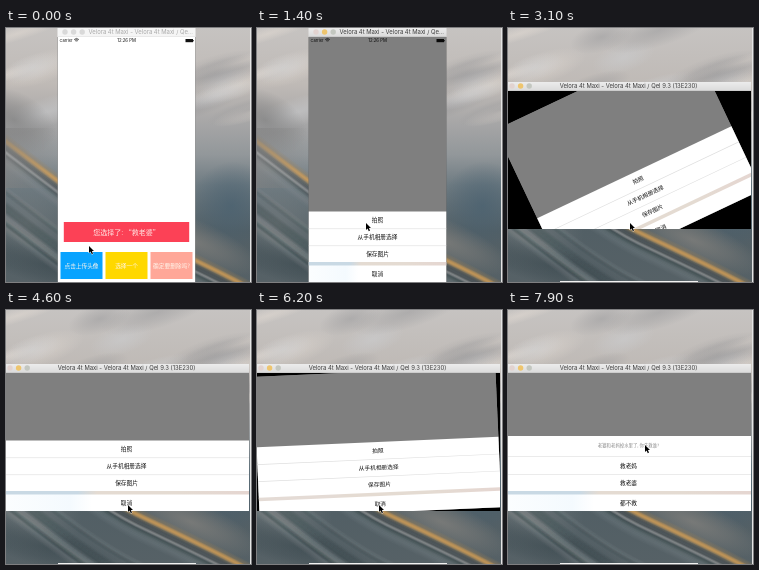
An HTML page with a canvas for the animation above (8 s loop, 245x254 px).

```html
<!DOCTYPE html>
<html lang="zh-CN">
<head>
<meta charset="utf-8">
<title>Action sheet demo</title>
<style>
  html, body { margin: 0; width: 100%; height: 100%; overflow: hidden; background: #777; }
  canvas { display: block; width: 245px; height: 254px; }
</style>
</head>
<body>
<canvas id="stage"></canvas>
<script>
const W = 245, H = 254, LOOP = 8000, STEP = 100;
const CJK = '"Noto Sans CJK SC", "Noto Sans CJK", "Noto Sans", sans-serif';
const LATIN = 'Inter, "Open Sans", sans-serif';
const DEVICE = 'Velora 4t Maxi';

const canvas = document.getElementById('stage');
const ctx = canvas.getContext('2d');
const dpr = Math.max(1, window.devicePixelRatio || 1);
canvas.width = W * dpr;
canvas.height = H * dpr;

// Content area of the window in each orientation
const PORTRAIT = { x: 51.5, y: 9, w: 138, h: 245 };
const LANDSCAPE = { x: -2, y: 63, w: 245, h: 138 };

// [start, landscape]
const TURNS = [[0, false], [2840, true], [4640, false], [5840, true]];
const TURN_TIME = 400;

// [time, x, y] of the pointer tip
const POINTER = [
  [0, 83, 218], [400, 77, 232], [1200, 77, 232], [1400, 109, 195],
  [1600, 111, 196], [1800, 114, 196], [1900, 114, 196], [2300, 122, 195],
  [6250, 122, 195], [6450, 130, 116], [6900, 130, 116], [7200, 122, 184],
  [7600, 122, 184], [7900, 137, 135], [8000, 137, 135]
];

const SHEETS = [
  { open: [850, 1250], close: [6400, 6650], height: 70.5,
    rows: [['拍照', 62], ['从手机相册选择', 45], ['保存图片', 28], ['取消', 8.5]],
    lines: [53.5, 36.5] },
  { open: [7300, 7650], close: [9000, 9100], height: 75,
    caption: ['老婆和老妈掉水里了, 你先救谁?', 65.5],
    rows: [['救老妈', 45.5], ['救老婆', 28], ['都不救', 8.5]],
    lines: [55, 37] }
];

const clamp = v => Math.min(1, Math.max(0, v));
const lerp = (a, b, p) => a + (b - a) * p;
const span = (t, [a, b]) => clamp((t - a) / (b - a));
const smooth = p => p * p * (3 - 2 * p);
const easeOut = p => 1 - (1 - p) ** 3;

function box(x, y, w, h, fill) {
  ctx.fillStyle = fill;
  ctx.fillRect(x, y, w, h);
}

function text(str, x, y, size, fill, family = CJK, align = 'center') {
  ctx.font = `${size}px ${family}`;
  ctx.textAlign = align;
  ctx.textBaseline = 'middle';
  ctx.fillStyle = fill;
  ctx.fillText(str, x, y);
}

function blend(x0, y0, x1, y1, stops) {
  const g = ctx.createLinearGradient(x0, y0, x1, y1);
  stops.forEach(([at, color]) => g.addColorStop(at, color));
  return g;
}

function dot(x, y, r, fill) {
  ctx.fillStyle = fill;
  ctx.beginPath();
  ctx.arc(x, y, r, 0, Math.PI * 2);
  ctx.fill();
}

// Soft elliptical patch of light or shade
function cloud(x, y, rx, ry, tilt, rgb, alpha) {
  ctx.save();
  ctx.translate(x, y);
  ctx.rotate(tilt);
  ctx.scale(rx, ry);
  const g = ctx.createRadialGradient(0, 0, 0, 0, 0, 1);
  g.addColorStop(0, `rgba(${rgb},${alpha})`);
  g.addColorStop(.5, `rgba(${rgb},${alpha * .55})`);
  g.addColorStop(1, `rgba(${rgb},0)`);
  dot(0, 0, 1, g);
  ctx.restore();
}

function streak(shift, width, color) {
  ctx.beginPath();
  ctx.moveTo(-10, 106 + shift);
  ctx.bezierCurveTo(45, 148 + shift, 90, 184 + shift, 130, 204 + shift);
  ctx.bezierCurveTo(165, 221 + shift, 205, 239 + shift, 255, 266 + shift);
  ctx.lineWidth = width;
  ctx.strokeStyle = color;
  ctx.stroke();
}

function softStreak(shift, width, rgb, alpha) {
  for (let i = 1; i <= 5; i++) streak(shift, width * i / 5, `rgba(${rgb},${alpha / 5})`);
}

function drawWallpaper() {
  box(0, 0, W, H, blend(0, 0, 0, H, [
    [0, '#c6c3c1'], [.22, '#bfbab6'], [.36, '#a9a8a8'], [.5, '#92979a'],
    [.62, '#6d7a81'], [.8, '#525f65'], [1, '#566166']
  ]));
  let seed = 11;
  const random = () => (seed = seed * 16807 % 2147483647) / 2147483647;
  for (let i = 0; i < 24; i++) {
    const tone = ['228,220,212', '150,150,152', '205,207,210'][i % 3];
    cloud(random() * W, random() * 105, 25 + random() * 35, 6 + random() * 12, -.3, tone, .5);
  }
  cloud(8, 92, 45, 28, .5, '125,125,125', .7);
  cloud(20, 195, 60, 45, .6, '120,126,128', .6);
  cloud(225, 178, 40, 45, .2, '72,96,112', .7);
  cloud(185, 212, 75, 22, .4, '132,130,126', .75);
  cloud(40, 238, 90, 20, .3, '58,72,78', .6);
  for (let i = 0; i < 14; i++) {
    const light = i % 2;
    softStreak(5 + random() * 85, 4 + random() * 10, light ? '175,182,184' : '40,52,58', light ? .16 : .22);
  }
  softStreak(9, 13, '48,50,50', .45);
  softStreak(-1, 11, '165,128,82', .6);
  softStreak(0, 5.5, '224,168,82', .9);
  box(0, 100, 52, 60, blend(0, 0, 52, 0, [[0, 'rgba(130,130,130,.55)'], [1, 'rgba(130,130,130,0)']]));
  softStreak(11, 4, '205,207,206', .5);
  box(244, 0, 1, H, '#e4e4e4');
}

function drawTitleBar(area, landscape, active) {
  const top = area.y - 9, x = landscape ? 0 : area.x;
  const width = area.x + area.w - x;
  box(x, top, width, 9, active
    ? blend(0, top, 0, top + 9, [[0, '#ececec'], [1, '#dadada']]) : '#f5f5f5');
  box(x, top + 8.5, width, .5, active ? '#bcbcbc' : '#dddddd');
  const lights = active ? ['#e2d3d0', '#eec56e', '#c3c7c0'] : ['#d9d9d9', '#d9d9d9', '#d9d9d9'];
  const first = landscape ? 4 : 59;
  lights.forEach((color, i) => dot(first + i * 8.6, top + 4, 2.7, color));
  const ink = active ? '#3d3d3d' : '#a9a9a9';
  if (landscape) {
    text(`${DEVICE} - ${DEVICE} / Qel 9.3 (13E230)`, 120.5, top + 4.2, 5.9, ink, LATIN);
  } else {
    text(`${DEVICE} - ${DEVICE} / Qe...`, 82.5, top + 4.2, 5.9, ink, LATIN, 'left');
  }
}

function drawStatusBar(w) {
  text('Carrier', 2, 3.6, 4, '#111', LATIN, 'left');
  ctx.strokeStyle = '#111';
  ctx.lineWidth = .7;
  for (const r of [1, 2.2, 3.4]) {
    ctx.beginPath();
    ctx.arc(19, 5, r, -Math.PI * .75, -Math.PI * .25);
    ctx.stroke();
  }
  text('12:26 PM', w / 2, 3.6, 4.3, '#111', LATIN);
  box(w - 10, 2, 7.5, 3.2, '#111');
  box(w - 2.2, 3, .7, 1.3, '#111');
}

function drawHome(w, h) {
  box(0, 0, w, h, '#fff');
  box(6.3, h - 60, w - 12.6, 20, '#fc4156');
  text('您选择了: “救老婆”', w / 2, h - 50, 7, '#ffe9e6');
  const bw = (w - 12) / 3;
  [['#08a3ff', '点击上传头像'], ['#ffd800', '选择一个'], ['#ffa798', '确定要删除吗?']]
    .forEach(([color, label], i) => {
      const x = 3 + i * (bw + 3);
      box(x, h - 30, bw, 27, color);
      text(label, x + bw / 2, h - 16.5, 5.7, '#fff6ec');
    });
}

function drawSheet(sheet, w, h, shown, tinted) {
  box(0, 0, w, h, `rgba(0,0,0,${.5 * shown})`);
  ctx.save();
  ctx.translate(0, (1 - shown) * sheet.height);
  box(0, h - sheet.height, w, sheet.height, '#fff');
  sheet.lines.forEach(y => box(0, h - y, w, .6, '#dedede'));
  const edge = tinted ? '#c9d9e4' : '#e4dbd5';
  box(0, h - 20, w, 3.5, blend(0, 0, w, 0,
    [[0, edge], [.3, edge], [.38, '#e4dbd2'], [.7, '#e4dbd2'], [1, '#e5d6d1']]));
  if (tinted) {
    box(0, h - 16.5, w * .36, 16.5, blend(0, 0, w * .36, 0,
      [[0, 'rgba(70,170,240,.02)'], [.75, 'rgba(70,170,240,.06)'], [1, 'rgba(70,170,240,0)']]));
  }
  if (sheet.caption) text(sheet.caption[0], w / 2, h - sheet.caption[1], 4.4, '#8a8a8a');
  sheet.rows.forEach(([label, y]) => text(label, w / 2, h - y, 5.7, '#111'));
  ctx.restore();
}

function drawWindow(t) {
  const [start, landscape] = TURNS.filter(turn => turn[0] <= t).pop();
  const area = landscape ? LANDSCAPE : PORTRAIT;
  const before = landscape ? PORTRAIT : LANDSCAPE;
  const p = start ? smooth(clamp((t - start) / TURN_TIME)) : 1;
  const w = lerp(before.w, area.w, p), h = lerp(before.h, area.h, p);

  if (landscape) box(52, 253, 138, 1, '#f2f2f2');
  drawTitleBar(area, landscape, t >= 800);
  ctx.save();
  ctx.beginPath();
  ctx.rect(area.x, area.y, area.w, area.h);
  ctx.clip();
  box(area.x, area.y, area.w, area.h, '#000');
  ctx.translate(area.x + area.w / 2, area.y + area.h / 2);
  ctx.rotate((landscape ? -1 : 1) * (1 - p) * Math.PI / 2);
  ctx.translate(-w / 2, -h / 2);
  drawHome(w, h);
  if (!landscape) drawStatusBar(w);
  for (const sheet of SHEETS) {
    const shown = easeOut(span(t, sheet.open)) * (1 - smooth(span(t, sheet.close)));
    if (shown > 0) drawSheet(sheet, w, h, shown, t < 4650 || t > 7000);
  }
  ctx.restore();
}

function drawPointer(t) {
  const i = Math.max(1, POINTER.findIndex(k => k[0] > t));
  const [t0, x0, y0] = POINTER[i - 1], [t1, x1, y1] = POINTER[i];
  const p = smooth(span(t, [t0, t1]));
  ctx.save();
  ctx.translate(lerp(x0, x1, p), lerp(y0, y1, p));
  const arrow = new Path2D('M0 0V7L1.6 5.6L2.8 8.2L4 7.6L2.9 5.1H5Z');
  ctx.lineWidth = 1;
  ctx.strokeStyle = '#fff';
  ctx.stroke(arrow);
  ctx.fillStyle = '#000';
  ctx.fill(arrow);
  ctx.restore();
}

function render(now) {
  const t = Math.floor(now % LOOP / STEP) * STEP;
  ctx.setTransform(dpr, 0, 0, dpr, 0, 0);
  drawWallpaper();
  drawWindow(t);
  drawPointer(t);
}

const origin = performance.now();
function tick() {
  render(performance.now() - origin);
  requestAnimationFrame(tick);
}
tick();
</script>
</body>
</html>
```
